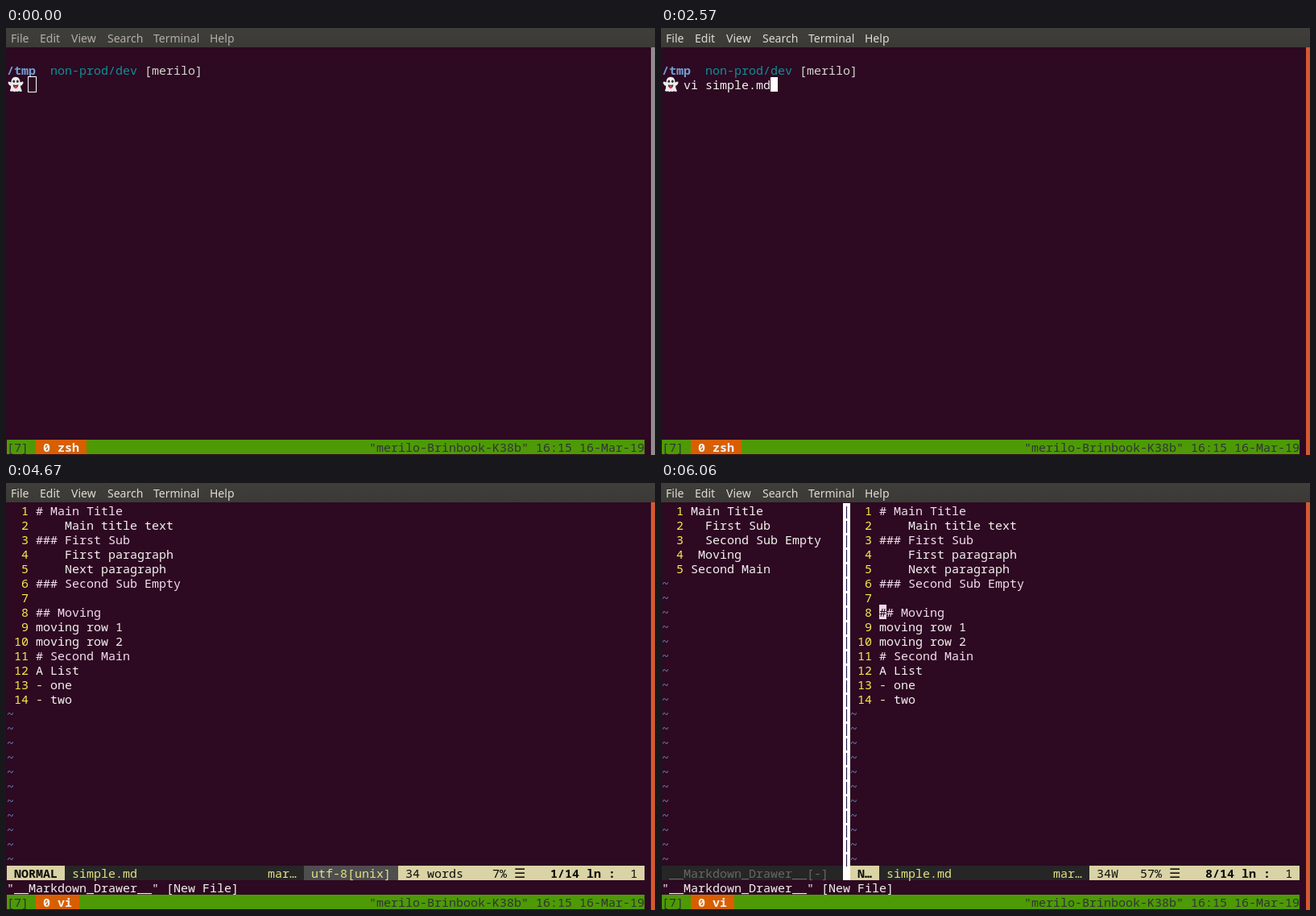
An HTML page for the animation above (8 s loop, 806 px wide and 530 px high).

```html
<!DOCTYPE html>
<html lang="en">
<head>
<meta charset="utf-8">
<title>Markdown drawer in a terminal</title>
<style>
html, body { margin: 0; width: 100%; height: 100%; overflow: hidden; background: #2d0922; }
#stage { position: relative; width: 806px; height: 530px; overflow: hidden; }

#menu { position: absolute; inset: 0 0 auto; height: 24px; background: linear-gradient(#3f3e3a, #3b3a36);
  font: 14px/25px "Noto Sans", "Open Sans", sans-serif; color: #dfdbd2; animation: menu 8s step-end infinite; }
#menu span { position: absolute; left: var(--x); }
#scroll { position: absolute; left: 801px; top: 24px; width: 5px; height: 506px; background: #d5592f;
  animation: scroll 8s step-end infinite; }

/* Terminal grid: 88 x 28 cells of 9 x 18 px */
#term { position: absolute; left: 1px; top: 25px; width: 792px; height: 504px;
  font: 15px/18px "Noto Sans Mono", "DejaVu Sans Mono", monospace; color: #f4f2f0; }
#term pre { margin: 0; font: inherit; }
.at { position: absolute; left: calc(var(--c, 0) * 9px); top: calc(var(--r, 0) * 18px); white-space: pre; }
.bar { display: flex; height: 18px; }
.gap { width: 9px; }

.cur { width: 9px; height: 18px; background: #fff; color: #2d0922; }
.hollow { width: 9px; height: 18px; margin: -1px; border: 1px solid #fff; }
.hint { color: #555753; }
.cur.dim { background: #555753; color: #2d0922; }
.path { color: #729fcf; font-weight: bold; }
.env { color: #118f93; }
.user { color: #d3d7cf; }
i { font-style: normal; color: #fce94f; }
.dash { color: #efe4a6; }
.h { color: #f3deee; }
.tilde { color: #6288b8; }
.tan { background: #dad3a5; color: #0c0c0c; }
.dark { background: #262626; color: #e4e086; }
.mid { background: #4e4e4e; color: #e4e086; }
.off { background: #262626; color: #666; }
.menu-sign { display: inline-block; width: 9px; font: 16px/0 "DejaVu Sans", sans-serif; }
.split { width: 9px; height: 468px; background: #fff; color: #231347; }
.tmux { width: 792px; background: #4e9a06; color: #2e3436; }
.win { background: #d75f00; color: #f4f2f0; font-weight: bold; }

/* Timed layers stay hidden outside their window */
.t { opacity: 0; animation: var(--k) 8s step-end infinite; }
#doc { animation: doc 8s step-end infinite; opacity: 0; white-space: normal; }
#step { animation: step 8s step-end infinite; opacity: 0; }
#mark { animation: mark 8s step-end infinite; opacity: 0; background: #f0d9e6; }

@keyframes menu { 0% { color: #b3afa7 } 9.125% { color: #dfdbd2 } }
@keyframes scroll { 0% { background: #918b8e } 9.625% { background: #d5592f } }
@keyframes shell { 0% { opacity: 1 } 33.125% { opacity: 0 } }
@keyframes idle { 0% { opacity: 1 } 9.125% { opacity: 0 } }
@keyframes focus { 0% { opacity: 0 } 9.125% { opacity: 1 } 21.625% { opacity: 0 } }
@keyframes key1 { 0% { opacity: 0 } 21.625% { opacity: 1 } 22.25% { opacity: 0 } }
@keyframes key2 { 0% { opacity: 0 } 22.25% { opacity: 1 } 23.375% { opacity: 0 } }
@keyframes key3 { 0% { opacity: 0 } 23.375% { opacity: 1 } 32.125% { opacity: 0 } }
@keyframes full { 0% { opacity: 0 } 32.125% { opacity: 1 } }
@keyframes end { 0% { opacity: 0 } 32.125% { opacity: 1 } 32.625% { opacity: 0 } }
@keyframes enter { 0% { opacity: 0 } 32.625% { opacity: 1 } }
@keyframes zsh { 0% { opacity: 1 } 33.75% { opacity: 0 } }
@keyframes vi { 0% { opacity: 0 } 33.75% { opacity: 1 } }
@keyframes opened { 0% { opacity: 0 } 33.75% { opacity: 1 } 58.375% { opacity: 0 } }
@keyframes created { 0% { opacity: 0 } 58.375% { opacity: 1 } }
@keyframes single { 0% { opacity: 0 } 34.375% { opacity: 1 } 59.125% { opacity: 0 } }
@keyframes drawer { 0% { opacity: 0 } 59.125% { opacity: 1 } }
@keyframes left { 0% { opacity: 0 } 59.125% { opacity: 1 } 75.75% { opacity: 0 } }
@keyframes right { 0% { opacity: 0 } 75.75% { opacity: 1 } }
@keyframes first { 0% { opacity: 0 } 59.125% { opacity: 1 } 68% { opacity: 0 } }
@keyframes doc {
  0% { opacity: 0; left: 0 }
  34.375% { opacity: 1; left: 0 }
  59.125% { opacity: 1; left: 234px }
}
@keyframes step {
  0% { opacity: 0; top: 18px }
  68% { opacity: 1; top: 18px }
  70.125% { opacity: 1; top: 36px }
  72.5% { opacity: 1; top: 54px }
  75.75% { opacity: 0; top: 54px }
}
@keyframes mark {
  0% { opacity: 0; top: 0 }
  34.375% { opacity: 1; top: 0 }
  58.375% { opacity: 0; top: 0 }
  75.75% { opacity: 1; top: 126px }
}
</style>
</head>
<body>
<div id="stage">
  <div id="menu">
    <span style="--x:6px">File</span><span style="--x:42px">Edit</span><span style="--x:81px">View</span>
    <span style="--x:126px">Search</span><span style="--x:183px">Terminal</span><span style="--x:253px">Help</span>
  </div>
  <div id="scroll"></div>

  <div id="term">
    <div class="t" style="--k:shell">
      <div class="at" style="--r:1"><span class="path">/tmp</span>  <span class="env">non-prod/dev</span> <span class="user">[merilo]</span></div>
      <svg class="at" style="--r:2;margin:-1px 0 0 1px" width="20" height="20" viewBox="0 0 20 20">
        <path fill="#ececec" d="M10 .8C14 .8 15.5 4 15.6 7.6L18.3 6.6Q20 6.6 19.4 8.6Q18.4 11 15.9 12Q16.3 15.5 18 18.3Q16 19.8 14 18.3Q12.4 19.8 10.3 18.4Q8.3 20 6.6 18.3Q4.4 19.6 2.8 17.8Q4.3 15 4.2 12Q1.4 11 .6 8.6Q.2 6.6 1.8 6.6L4.5 7.6C4.5 4 6 .8 10 .8Z"/>
        <ellipse cx="7.8" cy="6.3" rx="1.4" ry="1.8" fill="#333"/>
        <ellipse cx="12.3" cy="6.3" rx="1.4" ry="1.8" fill="#333"/>
        <path fill="#333" d="M6.8 10.2Q10 11.4 13.3 10.2Q13 14.6 10 14.6Q7 14.6 6.8 10.2Z"/>
        <path fill="#e0344f" d="M8.3 12.1Q10 11.1 11.8 12.1V14.2Q10 16.5 8.3 14.2Z"/>
      </svg>

      <div class="at hollow t" style="--r:2;--c:3;--k:idle"></div>
      <div class="at cur t" style="--r:2;--c:3;--k:focus"></div>
      <div class="t" style="--k:key1">
        <div class="at" style="--r:2;--c:3">v<span class="hint">  simple.md</span></div>
        <div class="at cur dim" style="--r:2;--c:4">i</div>
      </div>
      <div class="t" style="--k:key2">
        <div class="at" style="--r:2;--c:3">vi<span class="hint"> simple.md</span></div>
        <div class="at cur dim" style="--r:2;--c:5"></div>
      </div>
      <div class="t" style="--k:key3">
        <div class="at" style="--r:2;--c:3">vi <span class="hint"> imple.md</span></div>
        <div class="at cur dim" style="--r:2;--c:6">s</div>
      </div>
      <div class="at t" style="--r:2;--c:3;--k:full">vi simple.md</div>
      <div class="at cur t" style="--r:2;--c:15;--k:end"></div>
      <div class="at cur t" style="--r:3;--k:enter"></div>
    </div>

    <div id="doc" class="at">
<pre><i>  1 </i><span class="h"># Main Title</span>
<i>  2 </i>    Main title text
<i>  3 </i><span class="h">### First Sub</span>
<i>  4 </i>    First paragraph
<i>  5 </i>    Next paragraph
<i>  6 </i><span class="h">### Second Sub Empty</span>
<i>  7 </i>
<i>  8 </i><span class="h">## Moving</span>
<i>  9 </i>moving row 1
<i> 10 </i>moving row 2
<i> 11 </i><span class="h"># Second Main</span>
<i> 12 </i>A List
<i> 13 </i><span class="dash">-</span> one
<i> 14 </i><span class="dash">-</span> two
<span class="tilde">~
~
~
~
~
~
~
~
~
~
~</span></pre>
      <div id="mark" class="at cur" style="--c:4">#</div>
    </div>

    <div class="t" style="--k:drawer">
<pre class="at"><i>  1 </i>Main Title
<i>  2 </i>  First Sub
<i>  3 </i>  Second Sub Empty
<i>  4 </i> Moving
<i>  5 </i>Second Main
<span class="tilde">~
~
~
~
~
~
~
~
~
~
~
~
~
~
~
~
~
~
~
~</span></pre>
<pre class="at split" style="--c:25">|
|
|
|
|
|
|
|
|
|
|
|
|
|
|
|
|
|
|
|
|
|
|
|
|</pre>
    </div>
    <div class="at cur t" style="--c:4;--k:first">M</div>
    <div id="step" class="at cur" style="--c:4"></div>

    <div class="at bar t" style="--r:25;--k:single">
      <b class="tan"> NORMAL </b>
      <span class="dark"> simple.md                  mar… </span>
      <span class="mid"> utf-8[unix] </span>
      <span class="tan"> 34 words    7% <span class="menu-sign">☰</span>    <b>1/14 ln</b> <b>:</b>  1 </span>
    </div>
    <div class="at bar t" style="--r:25;--k:left">
      <b class="tan"> N… </b>
      <span class="dark"> &lt;kdown_Drawer__[-]  </span>
      <span class="gap"></span>
      <span class="off"> simple.md             mar…  34 words    7% <span class="menu-sign">☰</span>    1/14 ln :  1 </span>
    </div>
    <div class="at bar t" style="--r:25;--k:right">
      <span class="off"> __Markdown_Drawer__[-]  </span>
      <span class="gap"></span>
      <b class="tan"> N… </b>
      <span class="dark"> simple.md              mar… </span>
      <span class="tan"> 34W   57% <span class="menu-sign">☰</span>    <b>8/14 ln</b> <b>:</b>  1 </span>
    </div>

    <div class="at t" style="--r:26;--k:opened">"simple.md" 14L, 177C</div>
    <div class="at t" style="--r:26;--k:created">"__Markdown_Drawer__" [New File]</div>

    <div class="at bar tmux" style="--r:27"><span>[7]</span></div>
    <div class="at bar win t" style="--r:27;--c:4;--k:zsh"><span> 0 zsh </span></div>
    <div class="at bar win t" style="--r:27;--c:4;--k:vi"><span> 0 vi </span></div>
    <div class="at" style="--r:27;--c:50;color:#2e3436">"merilo-Brinbook-K38b" 16:15 16-Mar-19</div>
  </div>
</div>
</body>
</html>
```
